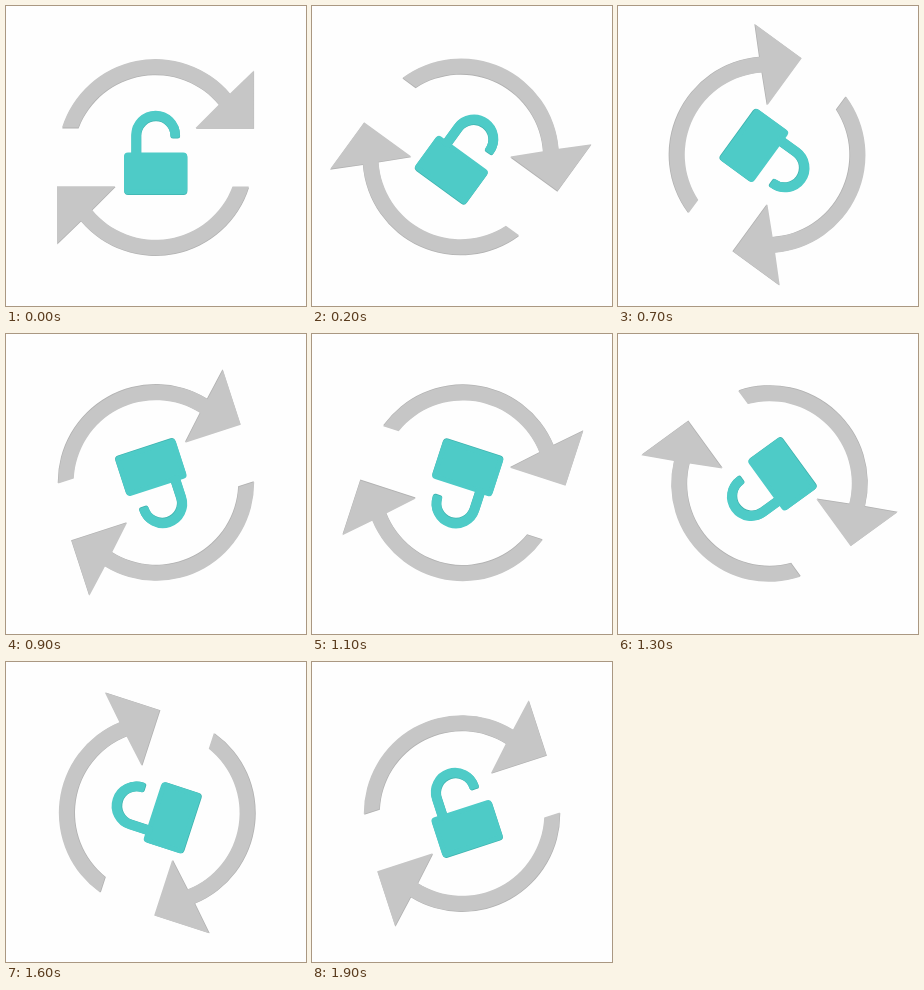
Recreate the animation shown at these times as an HTML page. Size 300x300 px, loop 2 s.

```html
<!DOCTYPE html>
<html lang="en">
<head>
<meta charset="utf-8">
<title>Rotating padlock</title>
<style>
  html, body { margin: 0; width: 100%; height: 100%; overflow: hidden; background: #fefefe; }
  svg { display: block; width: 100%; height: 100%; }
</style>
</head>
<body>
<svg viewBox="0 0 300 300">
  <defs>
    <path id="arrow" d="M56 121.6A98 98 0 0 1 224 87.4L247.8 64.4V122H189.5L212.9 98.5A82.3 82.3 0 0 0 72.3 121.6Z"/>
    <g id="arrows">
      <use href="#arrow"/>
      <use href="#arrow" transform="rotate(180 149.4 151.1)"/>
    </g>
    <!-- the round-joined stroke softens the corners -->
    <g id="lock" stroke-width="5" stroke-linejoin="round">
      <rect x="120.5" y="149" width="58.2" height="36.7" rx="1.5"/>
      <path d="M127.8 150V129A21.8 21.8 0 0 1 171.4 129V129.3H166.8A17.1 17.1 0 0 0 132.6 129V150Z"/>
    </g>
  </defs>
  <g id="spinner">
    <!-- each shape sits on a darker copy that forms its lower edge -->
    <use href="#arrows" x=".3" y=".8" fill="#b2b2b2"/>
    <use href="#arrows" fill="#c6c6c6"/>
    <use href="#lock" x=".2" y=".8" fill="#3fb3af" stroke="#3fb3af"/>
    <use href="#lock" fill="#4ecbc7" stroke="#4ecbc7"/>
  </g>
</svg>
<script>
  const STEP_MS = 100, STEPS = 20;
  const spinner = document.getElementById('spinner');
  const start = performance.now();

  function draw() {
    const step = Math.floor((performance.now() - start) / STEP_MS) % STEPS;
    spinner.setAttribute('transform', `rotate(${step * 360 / STEPS} 150 150)`);
    requestAnimationFrame(draw);
  }
  draw();
</script>
</body>
</html>
```
